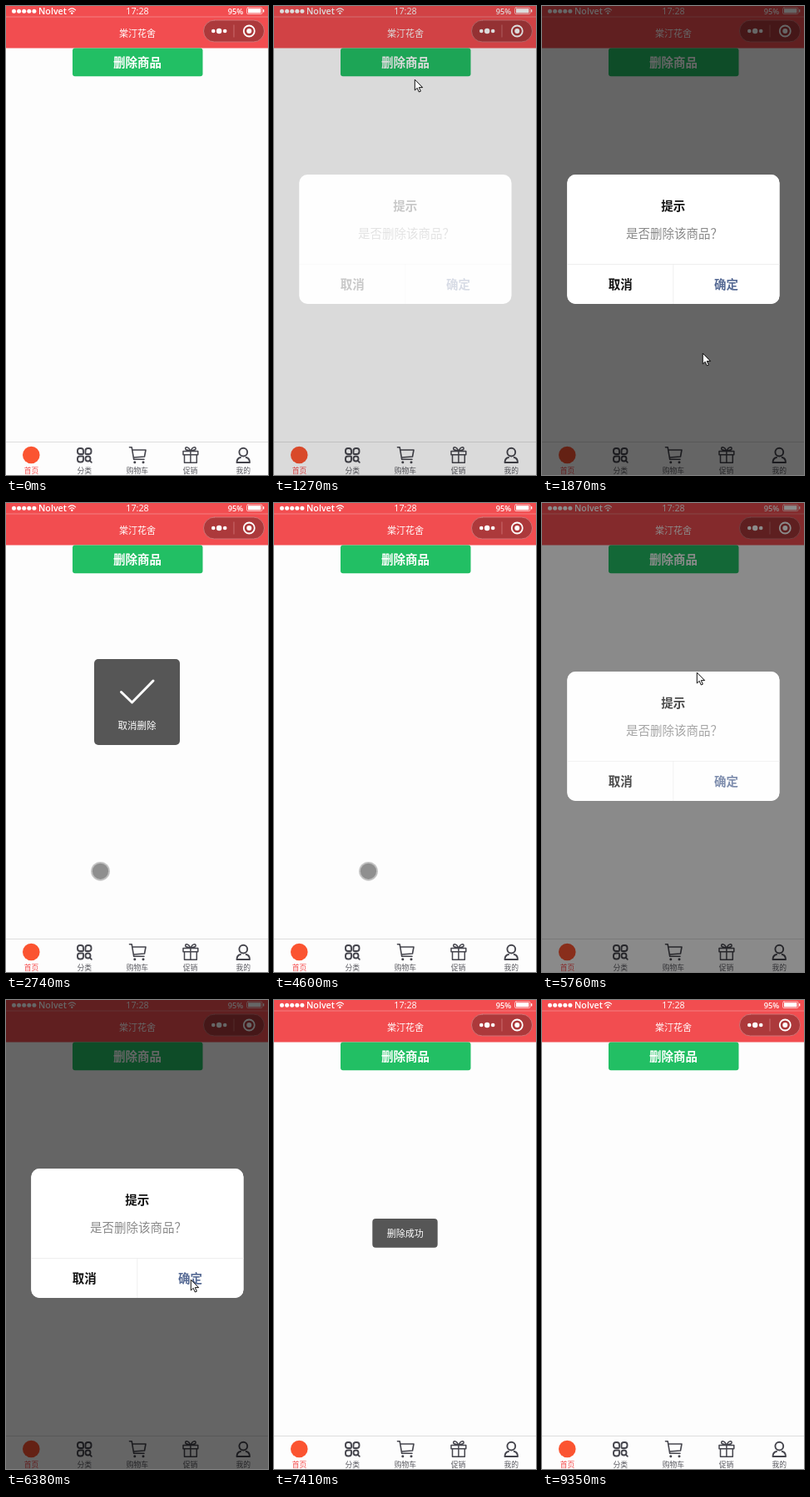
Recreate the animation shown at these times as an HTML page with a canvas. Size 315x562 px, loop 9.97 s.

```html
<!DOCTYPE html>
<html lang="zh-CN">
<head>
<meta charset="utf-8">
<style>
  html, body { margin: 0; width: 100%; height: 100%; overflow: hidden; background: #fdfdfd; }
  canvas { display: block; width: 315px; height: 562px; }
</style>
</head>
<body>
<canvas id="stage"></canvas>
<script>
const W = 315, H = 562, LOOP = 9970;
const CJK = '"Noto Sans CJK SC", "Noto Sans CJK", sans-serif';
const LATIN = '"Open Sans", "Noto Sans", sans-serif';
const canvas = document.getElementById('stage');
const ctx = canvas.getContext('2d');
const ratio = window.devicePixelRatio || 1;
canvas.width = Math.round(W * ratio);
canvas.height = Math.round(H * ratio);

// Pointer path: time, x, y
const path = [
  [460, 69.5, 237.5], [770, 163, 77.5], [940, 169, 88],
  [1730, 169, 88], [1870, 193, 416], [2150, 97, 340],
  [2500, 97, 340], [2690, 113.5, 438.5], [2740, 113.5, 441.3],
  [4910, 113.5, 441.3], [5330, 192, 62.5], [5460, 185, 66],
  [5600, 185, 66], [5760, 186, 203], [6380, 222, 335], [7400, 222, 335]
];
const dialogs = [
  { open: 1220, press: 2350, close: 2490, side: 0 },
  { open: 5623, press: 7100, close: 7235, side: 1 }
];
const FADE_IN = 300, FADE_OUT = 170;

const clamp = v => Math.max(0, Math.min(1, v));
const smooth = v => v * v * (3 - 2 * v);

// CSS "ease": cubic-bezier(.25, .1, .25, 1)
function ease(x) {
  let lo = 0, hi = 1, u = x;
  for (let i = 0; i < 20; i++) {
    u = (lo + hi) / 2;
    const bx = .75 * u * (1 - u) + u ** 3;
    if (bx < x) lo = u; else hi = u;
  }
  return .3 * u * (1 - u) ** 2 + 3 * u * u * (1 - u) + u ** 3;
}

function text(str, x, cy, size, color, { weight = 400, align = 'center', family = CJK } = {}) {
  ctx.font = `${weight} ${size}px ${family}`;
  ctx.textAlign = align;
  ctx.fillStyle = color;
  ctx.fillText(str, x, cy + size * .37);
}

function roundBox(x, y, w, h, r, fill, line) {
  ctx.beginPath();
  ctx.roundRect(x, y, w, h, r);
  if (fill) { ctx.fillStyle = fill; ctx.fill(); }
  if (line) { ctx.strokeStyle = line; ctx.stroke(); }
}

function disc(x, y, r, fill) {
  ctx.beginPath();
  ctx.arc(x, y, r, 0, Math.PI * 2);
  ctx.fillStyle = fill;
  ctx.fill();
}

function rect(x, y, w, h, fill) {
  ctx.fillStyle = fill;
  ctx.fillRect(x, y, w, h);
}

function outline(d, color, width) {
  ctx.strokeStyle = color;
  ctx.lineWidth = width;
  ctx.stroke(new Path2D(d));
}

function statusBar() {
  for (let i = 0; i < 5; i++) disc(9.5 + i * 6.1, 6.3, 2.5, '#fff');
  text('Nolvet', 39, 5.8, 10.7, '#fff', { weight: 600, align: 'left', family: LATIN });
  outline('M75 4.8Q79.3 1 83.6 4.8M76.7 6.8Q79.3 4.6 81.9 6.8', '#fff', 1.1);
  disc(79.3, 8.8, 1.2, '#fff');
  text('17:28', 158, 6, 10.8, '#fff', { weight: 500, family: LATIN });
  text('95%', 285.3, 6.3, 9.3, '#fff', { weight: 600, align: 'right', family: LATIN });
  ctx.lineWidth = .8;
  roundBox(289.5, 2, 18.5, 7.6, 1.5, null, '#ffd9d9');
  rect(291, 3.2, 15.4, 5.2, '#fff');
  rect(309, 4.2, 1.3, 3.2, '#fff');
}

function header() {
  rect(0, 0, W, 50.5, '#f24d50');
  rect(0, 12.5, W, 1, '#f58082');
  statusBar();
  text('棠汀花舍', 158, 33, 11, '#fff');
  ctx.lineWidth = 1;
  roundBox(237.5, 17, 73, 26, 13, '#ac393b', '#d17375');
  disc(249.3, 30, 2.3, '#fff');
  disc(256.2, 30, 3.2, '#fff');
  disc(263.2, 30, 2.3, '#fff');
  rect(273.5, 22.5, 1, 15, '#c96c6e');
  ctx.beginPath();
  ctx.arc(292.3, 30, 6.5, 0, Math.PI * 2);
  ctx.strokeStyle = '#fff';
  ctx.lineWidth = 1.8;
  ctx.stroke();
  disc(292.3, 30, 3, '#fff');
}

function tabBar() {
  const ink = '#45454d';
  rect(0, 522, W, 1, '#dedede');
  ctx.lineCap = ctx.lineJoin = 'round';
  disc(30.3, 538, 10.3, '#fb5431');
  ctx.lineWidth = 1.9;
  roundBox(86, 530, 7, 7, [3, 3, 1, 3], null, ink);
  roundBox(95.5, 530, 7, 7, [3, 3, 3, 1], null, ink);
  roundBox(86, 539.5, 7, 7, [3, 1, 3, 3], null, ink);
  roundBox(95.5, 539.5, 6, 6, 3, null, ink);
  outline('M100.7 544.7L102.8 546.8', ink, 1.9);
  outline('M148.5 528.8H151.2L153.7 543.3H166M152.3 532H168L166.5 540L153.3 541', ink, 1.6);
  disc(154.8, 546.7, 1.5, ink);
  disc(165, 546.7, 1.5, ink);
  outline('M213 533.5H230.8V537.7H213ZM214.5 538V547.3H229.3V538M221.9 533.5V547'
    + 'M221.9 533.3C219 527 214.5 528 216 531.5L221.9 533.3C224.8 527 229.3 528 227.8 531.5Z', ink, 1.5);
  ctx.lineWidth = 1.9;
  roundBox(280.4, 529.7, 9.8, 9.8, 4.9, null, ink);
  outline('M282 541C278.5 541.7 277.5 543.5 277.5 547H293C293 543.5 292 541.7 288.7 541', ink, 1.9);
  ['首页', '分类', '购物车', '促销', '我的'].forEach((name, i) =>
    text(name, 30.5 + i * 63.7, 557, 8.8, i ? '#5a5a60' : '#f54b4b'));
}

function page() {
  rect(0, 0, W, H, '#fdfdfd');
  header();
  roundBox(80, 50.5, 156.5, 33.8, 3, '#22bf64');
  text('删除商品', 158, 67.7, 14.5, '#fff', { weight: 900 });
  tabBar();
}

function dialogAlpha(d, t) {
  return t < d.close ? ease(clamp((t - d.open) / FADE_IN)) : 1 - clamp((t - d.close) / FADE_OUT);
}

function drawDialog(d, t) {
  const alpha = dialogAlpha(d, t);
  if (!alpha) return;
  const box = [30.3, 202, 255.2, 155, 10];
  ctx.save();
  ctx.beginPath();
  ctx.rect(0, 0, W, H);
  ctx.roundRect(...box);
  ctx.fillStyle = `rgba(0,0,0,${.6 * alpha})`;
  ctx.fill('evenodd');
  ctx.globalAlpha = alpha;
  roundBox(...box, '#fff');
  if (t >= d.press) {
    ctx.clip();
    rect(d.side ? 158 : 30, 310, 128, 47, '#ececec');
  }
  rect(30.3, 309, 255.2, 1, '#eee');
  rect(157.3, 309, 1, 48, '#eee');
  text('提示', 157.8, 239.8, 14.5, '#111', { weight: 700 });
  text('是否删除该商品？', 159, 273, 14.5, '#888', { weight: 300 });
  text('取消', 94.3, 334, 14.5, '#111', { weight: 700 });
  text('确定', 221.5, 334, 14.5, '#576b95', { weight: 700 });
  ctx.restore();
}

function toasts(t) {
  const fill = 'rgba(17,17,17,.7)';
  if (t >= 2600 && t < 4600) {
    roundBox(106, 187, 103, 103, 5, fill);
    outline('M138.5 226.5L151.5 239L177 213', '#fff', 3);
    text('取消删除', 157.5, 266.5, 11.5, '#fff');
  }
  if (t >= 7340 && t < 9350) {
    roundBox(118.3, 262, 78.4, 34.7, 4, fill);
    text('删除成功', 157.8, 279.8, 11, '#fff');
  }
}

function pointerAt(t) {
  const i = path.findIndex(p => p[0] > t);
  if (i < 1) return null;
  const [t0, x0, y0] = path[i - 1], [t1, x1, y1] = path[i];
  const k = smooth((t - t0) / (t1 - t0));
  return [x0 + (x1 - x0) * k, y0 + (y1 - y0) * k];
}

function pointer(t) {
  const pos = pointerAt(t);
  if (!pos) return;
  const [x, y] = pos;
  if (dialogs.some(d => t >= d.open - 10 && t < d.close + FADE_OUT)) {
    ctx.save();
    ctx.translate(x, y);
    ctx.lineJoin = 'miter';
    const arrow = new Path2D('M.3 .5V13L3.2 10.3L5.3 15L7.4 14.1L5.3 9.6H9.3Z');
    ctx.fillStyle = '#fff';
    ctx.fill(arrow);
    ctx.strokeStyle = '#111';
    ctx.lineWidth = 1;
    ctx.stroke(arrow);
    ctx.restore();
  } else {
    disc(x, y, 11.4, 'rgba(0,0,0,.23)');
    disc(x, y, 9.6, 'rgba(0,0,0,.26)');
  }
}

const start = performance.now();

function frame() {
  const t = (performance.now() - start) % LOOP;
  ctx.setTransform(ratio, 0, 0, ratio, 0, 0);
  page();
  dialogs.forEach(d => drawDialog(d, t));
  toasts(t);
  pointer(t);
  requestAnimationFrame(frame);
}
frame();
</script>
</body>
</html>
```
